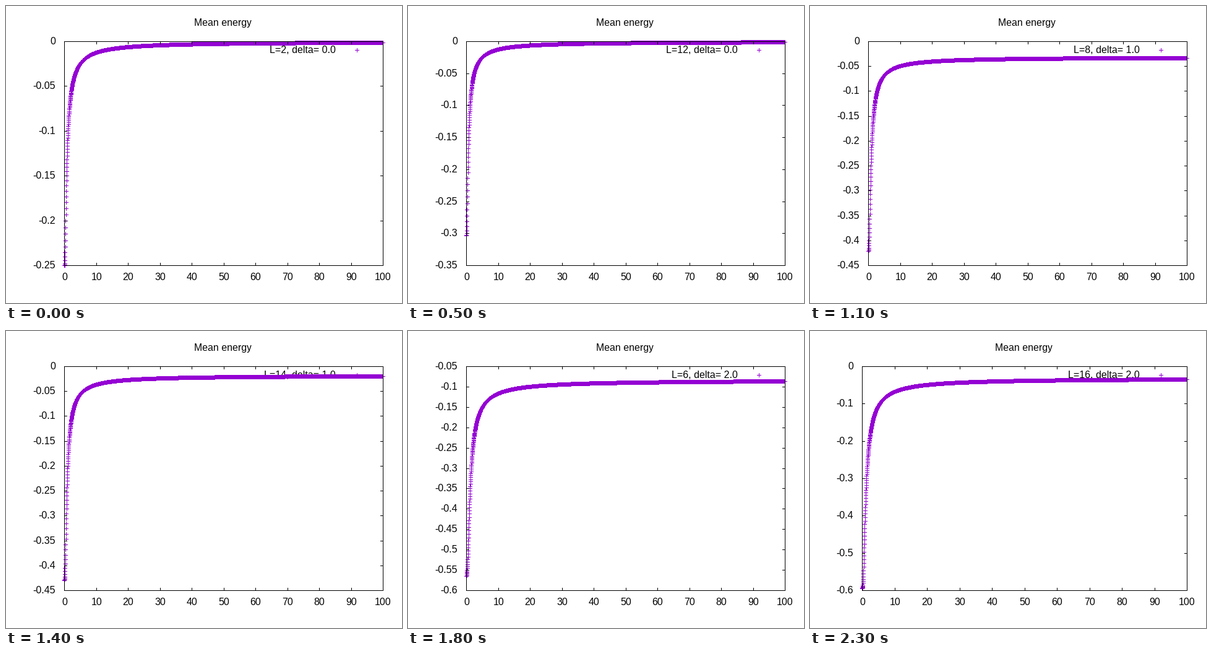
Write a matplotlib script that moves like this. It is 640 px wide and 480 px high and loops after 2.4 s.

```python
import numpy as np
import matplotlib.pyplot as plt
from matplotlib.animation import FuncAnimation

# Mean energy per site of open XXZ spin chains (zero magnetisation) against temperature.
W, H, DPI = 640, 480, 100
RIGHT, TOP, BOTTOM = 609, 57, 419
TIC = 5
PURPLE = (148, 0, 211, 255)
BLACK = (0, 0, 0, 255)
SIZES = range(2, 17, 2)
DELTAS = (0.0, 1.0, 2.0)
TEMPS = np.linspace(0.02, 100, 3000)

plt.rcParams["font.family"] = "Liberation Sans"
plt.rcParams["text.hinting"] = "default"


def chain(size):
    """Hopping matrix and Ising diagonal of the chain."""
    states = [s for s in range(1 << size) if bin(s).count("1") == size // 2]
    index = {s: i for i, s in enumerate(states)}
    hop = np.zeros((len(states), len(states)))
    ising = np.zeros(len(states))
    for i, s in enumerate(states):
        for b in range(size - 1):
            if (s >> b ^ s >> (b + 1)) & 1:
                ising[i] -= 0.25
                hop[i, index[s ^ (3 << b)]] = 0.5
            else:
                ising[i] += 0.25
    return hop, ising


def thermal(levels):
    weights = np.exp(-(levels - levels[0])[None, :] / TEMPS[:, None])
    return weights @ levels / weights.sum(axis=1)


def all_curves():
    total = {}
    for size in SIZES:
        if size <= 12:
            hop, ising = chain(size)
        for d in DELTAS:
            if size <= 12:
                total[d, size] = thermal(np.linalg.eigvalsh(hop + d * np.diag(ising)))
            else:
                # the total is almost linear in size, so extend it smoothly
                a, b, c = (total[d, size - k] for k in (2, 4, 6))
                total[d, size] = 3 * a - 3 * b + c
    return [(d, n, np.round(total[d, n] / n, 7)) for d in DELTAS for n in SIZES]


def tic_step(span):
    power = 10 ** np.floor(np.log10(span))
    slots = 20 * power / span
    for limit, step in ((40, 0.05), (20, 0.1), (10, 0.2), (4, 0.5), (2, 1)):
        if slots > limit:
            return step * power
    return 2 * power


def to_px(v):
    return np.floor(np.asarray(v) + 0.5).astype(int)


def stamp_plus(img, x, y):
    for k in range(-3, 4):
        img[y + k, x] = PURPLE
        img[y, x + k] = PURPLE


def label(x, y, text, ha):
    ax.text(x, y + 5, text, ha=ha, va="baseline", fontsize=16 * 72 / DPI, color="black")


curves = all_curves()

fig = plt.figure(figsize=(W / DPI, H / DPI), dpi=DPI, facecolor="white")
ax = fig.add_axes([0, 0, 1, 1])
picture = ax.imshow(np.zeros((H, W, 4), np.uint8), extent=(0, W, H, 0),
                    interpolation="nearest", aspect="auto", zorder=5)
ax.set_xlim(0, W)
ax.set_ylim(H, 0)
ax.axis("off")


def draw(frame):
    delta, size, energy = curves[frame]
    step = tic_step(energy.max() - energy.min())
    lo = int(np.floor(energy.min() / step + 1e-9))
    hi = int(np.ceil(energy.max() / step - 1e-9))
    names = [f"{round(k * step, 6):g}" for k in range(lo, hi + 1)]
    left = 94 if max(map(len, names)) > 4 else 84

    img = np.zeros((H, W, 4), np.uint8)
    img[..., :3] = 255
    for text in list(ax.texts):
        text.remove()

    x = to_px(left + TEMPS / 100 * (RIGHT - left))
    y = to_px(BOTTOM - (energy / step - lo) / (hi - lo) * (BOTTOM - TOP))
    stamp_plus(img, x, y)
    stamp_plus(img, 567, 71)

    img[[TOP, BOTTOM], left:RIGHT + 1] = BLACK
    img[TOP:BOTTOM + 1, [left, RIGHT]] = BLACK
    for ty, name in zip(to_px(np.linspace(BOTTOM, TOP, len(names))), names):
        img[ty, left:left + TIC] = BLACK
        img[ty, RIGHT - TIC + 1:RIGHT + 1] = BLACK
        label(left - 14, ty, name, "right")
    for k, tx in enumerate(to_px(np.linspace(left, RIGHT, 11))):
        img[TOP:TOP + TIC, tx] = BLACK
        img[BOTTOM - TIC + 1:BOTTOM + 1, tx] = BLACK
        label(tx + 0.5, 438, str(10 * k), "center")

    label((left + RIGHT) / 2 - 1.5, 27, "Mean energy", "center")
    label(533, 71, f"L={size}, delta= {delta:.1f}", "right")
    picture.set_data(img)
    return [picture, *ax.texts]


anim = FuncAnimation(fig, draw, frames=len(curves), interval=100, repeat=True,
                     repeat_delay=0, blit=False)
plt.show()
```
